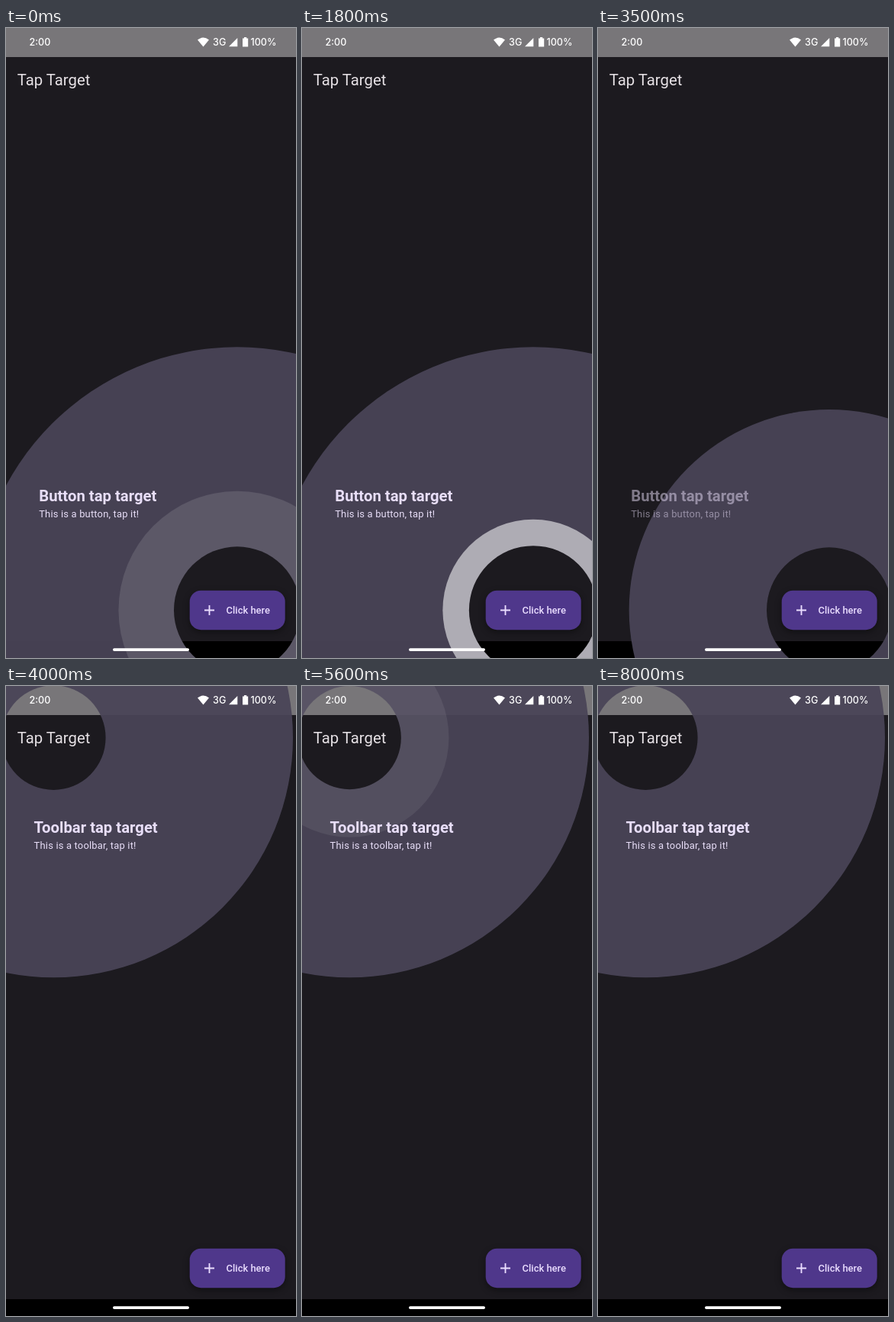
Write an HTML page that moves like this. It is 380 by 824 pixels and loops after 8100 ms.

```html
<!DOCTYPE html>
<html lang="en">
<head>
<meta charset="utf-8">
<title>Tap Target</title>
<style>
  html, body { margin: 0; height: 100%; overflow: hidden; background: #1c1a1f; }
  svg { display: block; width: 380px; height: 824px; font-family: Roboto, sans-serif; }
  .head { font-size: 20.3px; font-weight: 700; }
  .sub { font-size: 12.94px; letter-spacing: .18px; }
  .status { font: 500 12.6px Inter, sans-serif; fill: #fff; }
  .fab { filter: drop-shadow(0 3px 4px rgba(0, 0, 0, .4)); }
</style>
</head>
<body>
<svg viewBox="0 0 380 824">
  <mask id="cut" maskUnits="userSpaceOnUse" x="0" y="0" width="380" height="824">
    <rect width="380" height="824" fill="#fff"/>
    <circle id="hole"/>
  </mask>

  <rect width="380" height="824" fill="#1c1a1f"/>
  <rect width="380" height="38" fill="#787679"/>
  <rect y="802" width="380" height="22"/>
  <text x="14.8" y="75.3" font-size="20.3" fill="#e6e1e5">Tap Target</text>
  <rect class="fab" x="240.7" y="735.7" width="125" height="51.5" rx="14.8" fill="#4f378b"/>
  <path d="M260 761.5h13M266.5 755v13" stroke="#eaddff" stroke-width="1.85"/>
  <text x="288.6" y="766.4" font-size="12.94" font-weight="500" fill="#eaddff">Click here</text>

  <g mask="url(#cut)">
    <circle id="disc" fill="#4a4458" fill-opacity=".94"/>
    <circle id="ring" fill="#fff"/>
  </g>
  <g id="label" fill="#e8def8">
    <text id="head" class="head"></text>
    <text id="sub" class="sub" y="21"></text>
  </g>

  <g class="status">
    <text x="30.5" y="23">2:00</text>
    <text x="271" y="23">3G</text>
    <text x="320.5" y="23">100%</text>
    <path d="M251 15.6Q258.5 9.6 266 15.6L258.5 24.6ZM303.3 13V24.3H292ZM310 13.6h2v-1.6h3.2v1.6h2v10.8h-7.2z"/>
  </g>
  <rect x="140" y="811.2" width="100" height="3.8" rx="1.9" fill="#fff"/>
</svg>
<script>
const LOOP = 8100, PULSE = 1000, SWELL = 2.5;
const CLOSE = 3420, OPEN = 3720, MOVE = 250, FADE = 160;

const button = {
  x: 303, y: 761.3, outer: 344, inner: 82.7, tx: 43.2, ty: 619,
  head: 'Button tap target', sub: 'This is a button, tap it!', start: -842
};
const toolbar = {
  x: 62.3, y: 67.6, outer: 313.7, inner: 67.4, tx: 36.6, ty: 192,
  head: 'Toolbar tap target', sub: 'This is a toolbar, tap it!', start: OPEN
};

const el = id => document.getElementById(id);
const set = (id, attrs) => {
  for (const k in attrs) el(id).setAttribute(k, attrs[k]);
};
const unit = v => Math.min(1, Math.max(0, v));
const ease = v => .5 - .5 * Math.cos(Math.PI * unit(v));

let shown;
function show(target) {
  if (shown === target) return;
  shown = target;
  for (const id of ['hole', 'disc', 'ring']) set(id, { cx: target.x, cy: target.y });
  set('label', { transform: `translate(${target.tx} ${target.ty})` });
  el('head').textContent = target.head;
  el('sub').textContent = target.sub;
}

function draw(t) {
  const first = t < OPEN;
  const target = first ? button : toolbar;
  const closing = first ? ease((t - CLOSE) / MOVE) : 0;
  const size = first ? 1 - closing : ease((t - OPEN) / MOVE);
  const alpha = first ? 1 - unit((t - CLOSE) / FADE) : unit((t - OPEN) / MOVE);

  // The hole swells and relaxes; the ring spreads in the second half of each pulse.
  const beat = ease((t - target.start) % PULSE / PULSE);
  const swell = 1 - Math.abs(2 * beat - 1);
  const spread = unit(2 * beat - 1);
  const hole = closing ? target.inner - 3 * closing : target.inner + SWELL * swell;

  show(target);
  set('hole', { r: hole });
  set('disc', { r: target.outer * size });
  set('ring', { r: target.inner * (1 + spread), opacity: closing ? 0 : 1 - spread });
  set('label', { opacity: alpha });
}

const begin = performance.now();
function tick() {
  draw((performance.now() - begin) % LOOP);
  requestAnimationFrame(tick);
}
tick();
</script>
</body>
</html>
```
